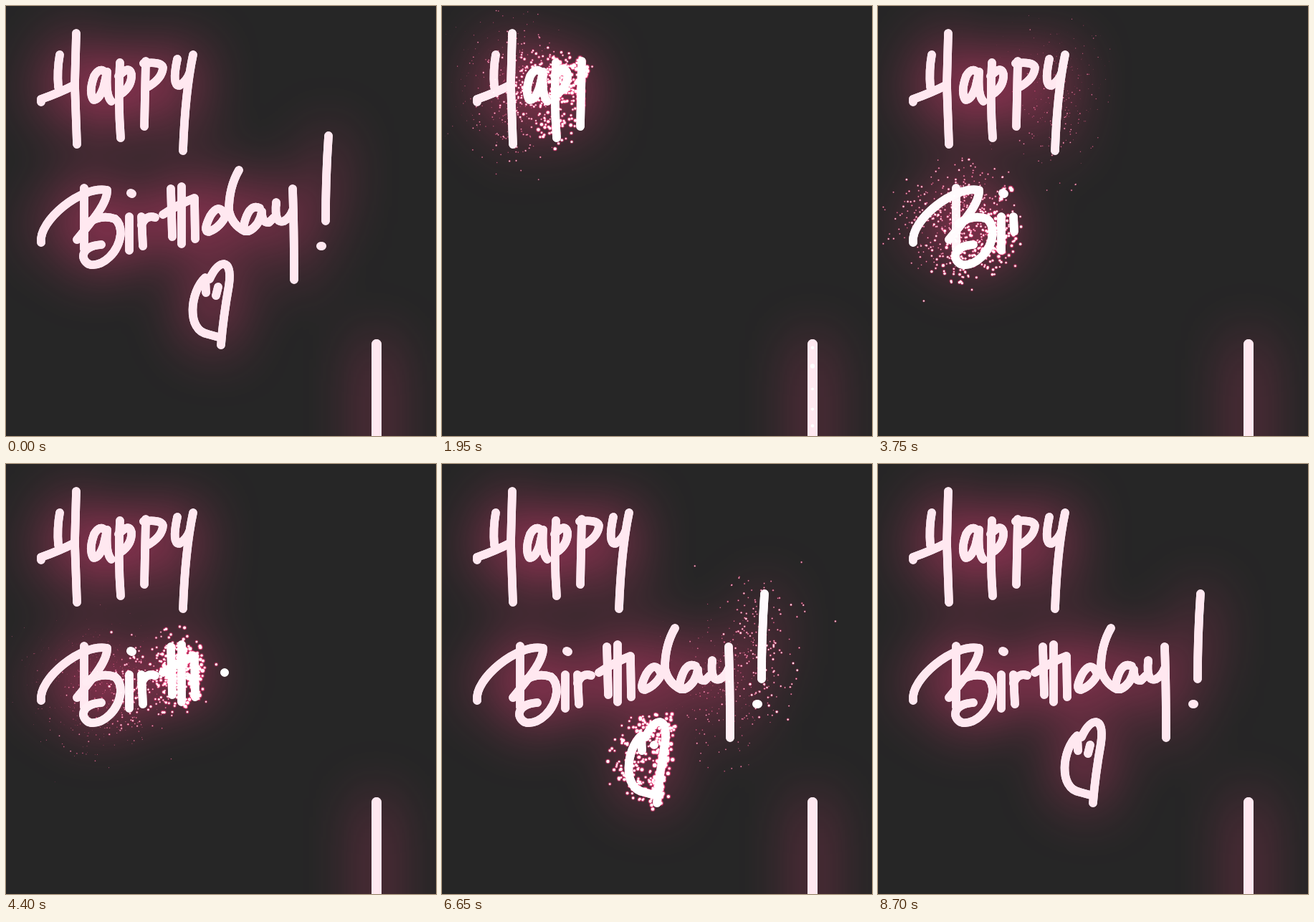
Recreate the animation shown at these times as an HTML page with a canvas. Size 600 by 600 pixels, loop 8.9 s.

```html
<!DOCTYPE html>
<html lang="en">
<head>
<meta charset="utf-8">
<title>Happy Birthday!</title>
<style>
  html, body { margin: 0; width: 100%; height: 100%; overflow: hidden; background: #262626; }
  canvas { display: block; width: 600px; height: 600px; }
</style>
</head>
<body>
<canvas id="stage" width="600" height="600"></canvas>
<script>
const LOOP = 8900, STEP = 50, SIZE = 600, TAIL = 120;
const GLOW = '#ff4081', BACK = '#262626';

// Each stroke: start ms, duration ms, path
const happy = [
  [400, 150, 'M75 68Q71 90 73 113'],
  [650, 100, 'M49 134L49 130Q75 121 96 110'],
  [850, 200, 'M98 38L96 110L99 193'],
  [1200, 300, 'M139 93Q131 84 123 98Q115 120 122 131Q130 131 136 114L141 92Q139 125 147 133'],
  [1550, 100, 'M159 79Q156 130 160 184'],
  [1700, 100, 'M157 98Q172 82 175 95Q176 112 160 123'],
  [1850, 100, 'M195 77L193 168'],
  [2050, 150, 'M192 80Q217 77 219 86Q218 102 196 114'],
  [2300, 150, 'M239 74Q231 112 242 111Q252 105 256 94'],
  [2500, 200, 'M261 68Q250 120 247 202']
];

const birth = [
  [2750, 100, 'M109 254L109 339'],
  [2900, 200, 'M49 330C45 300 105 250 141 257C142 275 120 300 99 326'],
  [3100, 50, 'M112 304Q132 290 152 297'],
  [3150, 200, 'M152 297Q160 303 160 318C157 345 135 363 118 361C104 357 101 335 133 333'],
  [3450, 100, 'M172 294L172 341'],
  [3600, 0, 'M174 261L176 262'],
  [3700, 100, 'M189 294L191 335'],
  [3800, 100, 'M189 306Q195 291 208 295'],
  [3950, 100, 'M230 255L232 322'],
  [4050, 100, 'M245 252L245 332'],
  [4150, 150, 'M219 291Q240 277 263 268L264 325']
];

const day = [
  [4400, 250, 'M305 291Q297 274 285 293Q274 315 283 315Q300 309 309 288'],
  [4700, 200, 'M325 229Q311 253 311 285Q315 305 333 314'],
  [4950, 250, 'M354 282Q341 276 334 298Q328 316 339 314Q354 306 357 287Q357 303 367 302L374 295'],
  [5300, 150, 'M377 278L377 274Q374 305 388 300Q396 296 400 285'],
  [5500, 150, 'M400 255Q402 310 402 382']
];

const marks = [
  [5800, 150, 'M450 181Q446 240 446 300'],
  [6050, 0, 'M439 335L441 335'],
  [6200, 200, 'M279 400L278 379C257 398 251 453 282 458L300 463'],
  [6400, 200, 'M284 381Q294 360 304 360Q315 362 311 390Q303 435 300 473'],
  [6650, 50, 'M296 392L293 404']
];

const bar = [[1950, 0, 'M517 472L517 720', 14, 0.035]];

let seed = 71;
function rand() {
  seed = (seed * 16807) % 2147483647;
  return seed / 2147483647;
}

const sparks = [];
const strokes = [...happy, ...birth, ...day, ...marks, ...bar].map(makeStroke);

function makeStroke([start, dur, d, width = 11.6, rate = 1.4]) {
  const path = document.createElementNS('http://www.w3.org/2000/svg', 'path');
  path.setAttribute('d', d);
  const length = path.getTotalLength();
  const count = Math.max(8, Math.round(length * rate));
  for (let i = 0; i < count; i++) {
    const at = (i + rand()) / count;
    const p = path.getPointAtLength(at * length);
    const far = rand() < 0.03 ? 1.8 : 1;
    sparks.push({
      x: p.x, y: p.y,
      born: start + at * dur,
      life: 1500 + 500 * rand(),
      angle: rand() * Math.PI * 2,
      reach: (5 + 95 * rand()) * far,
      size: 1.6 + 1.6 * rand()
    });
  }
  return { start, dur, width, length, shape: new Path2D(d) };
}

const ctx = document.getElementById('stage').getContext('2d');
const layer = document.createElement('canvas');
layer.width = SIZE;
layer.height = SIZE + TAIL;
const pen = layer.getContext('2d');
pen.lineCap = pen.lineJoin = 'round';

// Fresh ink is white and cools to pale pink
function inkColor(age) {
  const heat = Math.max(0, Math.min(1, (1400 - age) / 700));
  return `hsl(339 100% ${95.5 + 4.5 * heat}%)`;
}

function drawInk(t) {
  pen.clearRect(0, 0, SIZE, SIZE + TAIL);
  for (const s of strokes) {
    if (t < s.start) continue;
    const done = s.dur ? Math.min(1, (t - s.start) / s.dur) : 1;
    pen.setLineDash(done < 1 ? [done * s.length, s.length * 2] : []);
    pen.lineWidth = s.width;
    pen.strokeStyle = inkColor(s.width > 12 ? LOOP : t - s.start);
    pen.stroke(s.shape);
  }
}

function drawGlow() {
  ctx.save();
  ctx.shadowColor = GLOW;
  ctx.shadowBlur = 80;
  ctx.drawImage(layer, 0, 0);
  ctx.restore();
}

function liveSparks(t) {
  const live = [];
  for (const s of sparks) {
    const age = t - s.born;
    if (age < 0 || age >= s.life) continue;
    const left = 1 - age / s.life;
    const dist = s.reach * (1 - Math.exp(-age / 900));
    live.push({
      x: s.x + Math.cos(s.angle) * dist,
      y: s.y + Math.sin(s.angle) * dist,
      r: s.size * left ** 1.8,
      left
    });
  }
  return live;
}

function dot(x, y, r) {
  ctx.beginPath();
  ctx.arc(x, y, r, 0, Math.PI * 2);
  ctx.fill();
}

function draw(t) {
  ctx.globalAlpha = 1;
  ctx.fillStyle = BACK;
  ctx.fillRect(0, 0, SIZE, SIZE);
  const resting = t < STEP;
  drawInk(resting ? LOOP : t);
  drawGlow();
  const live = resting ? [] : liveSparks(t);

  // Halos lie under the ink, white cores on top
  ctx.fillStyle = GLOW;
  for (const s of live) {
    ctx.globalAlpha = 0.2 * s.left;
    dot(s.x, s.y, s.r + 1.9 * s.left);
    ctx.globalAlpha = 0.3 + 0.4 * s.left;
    dot(s.x, s.y, s.r + s.left);
  }
  ctx.globalAlpha = 1;
  ctx.drawImage(layer, 0, 0);
  ctx.fillStyle = '#fff';
  for (const s of live) {
    ctx.globalAlpha = Math.min(1, 0.3 + s.left);
    dot(s.x, s.y, s.r);
  }
}

const begun = performance.now();
let shown = -1;
function tick() {
  const t = Math.floor(((performance.now() - begun) % LOOP) / STEP) * STEP;
  if (t !== shown) draw(shown = t);
  requestAnimationFrame(tick);
}
tick();
</script>
</body>
</html>
```
